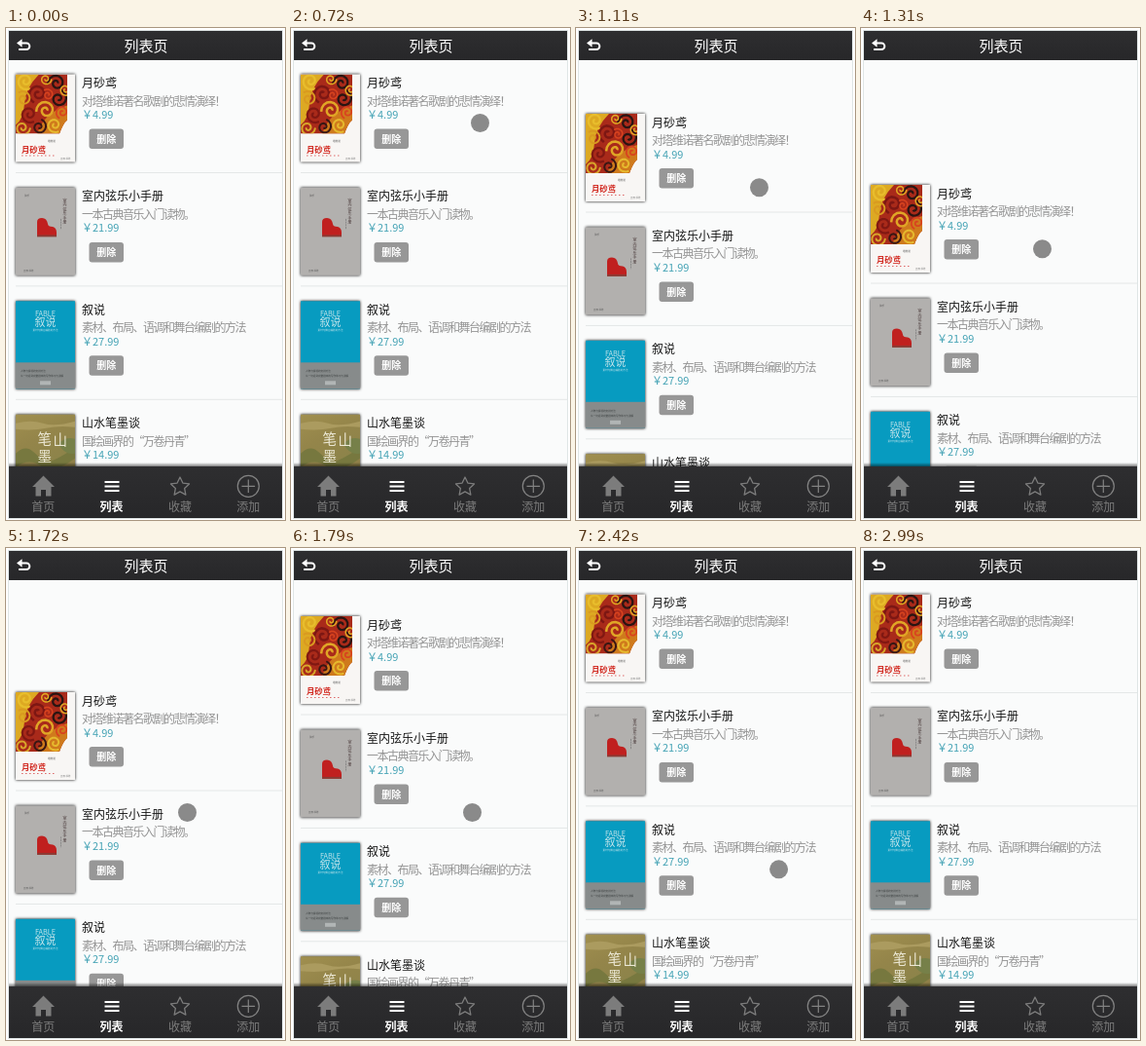
Recreate the animation shown at these times as an HTML page. Size 287x505 px, loop 3480 ms.

```html
<!DOCTYPE html>
<html lang="zh-CN">
<head>
<meta charset="utf-8">
<style>
  html, body { margin: 0; width: 100%; height: 100%; overflow: hidden; background: #fff; }
  svg { display: block; width: 287px; height: 505px; font-family: "Noto Sans CJK SC", "Noto Sans CJK", sans-serif; }
  .title { font-size: 12px; font-weight: 500; fill: #161616; }
  .desc { font-size: 12px; letter-spacing: -1.5px; fill: #949494; }
  .price { font-size: 11px; fill: #45a3b5; }
  .del { font-size: 10px; font-weight: 700; fill: #fff; text-anchor: middle; }
  .cover { filter: drop-shadow(0 0 1.8px #000); }
  .tab { font-size: 12px; text-anchor: middle; fill: #7c7c7c; }
  .tab.on { fill: #fff; font-weight: 700; }
  .tiny { font-size: 2.6px; }
</style>
</head>
<body>
<svg viewBox="0 0 287 505">
  <defs>
    <linearGradient id="bar" x2="0" y2="1">
      <stop stop-color="#2e2e30"/><stop offset="1" stop-color="#272729"/>
    </linearGradient>
    <linearGradient id="shade" x2="0" y2="1">
      <stop stop-color="#000" stop-opacity="0"/><stop offset="1" stop-color="#000" stop-opacity=".5"/>
    </linearGradient>
    <linearGradient id="gold" x2=".3" y2="1">
      <stop stop-color="#a08f4f"/><stop offset=".35" stop-color="#94854a"/><stop offset="1" stop-color="#85824a"/>
    </linearGradient>
    <clipPath id="page"><rect x="3" y="33" width="281" height="418"/></clipPath>
    <clipPath id="art"><path d="M0 0H53V47Q49 50 45 61H0Z"/></clipPath>
  </defs>
  <rect x="2.5" y="2.5" width="282" height="501" fill="#fafbfb" stroke="#dfe5e5"/>
  <g clip-path="url(#page)"><g id="list"></g></g>

  <rect x="3" y="3" width="281" height="30" fill="url(#bar)"/>
  <text x="144" y="23.5" font-size="15" font-weight="500" fill="#fff" text-anchor="middle">列表页</text>
  <g fill="none" stroke="#fff" stroke-width="2">
    <path d="M14 15.5H21A3.3 3.3 0 0 1 21 22.1H13"/>
    <path d="M16.5 11.2V19.8L11 15.5Z" fill="#fff" stroke="none"/>
  </g>

  <rect x="3" y="446" width="281" height="4" fill="url(#shade)"/>
  <rect x="3" y="450" width="281" height="53" fill="url(#bar)"/>
  <path d="M38.5 459.5L50 471H46.5V480.5H41V474H36V480.5H30.5V471H27Z" fill="#7c7c7c"/>
  <path d="M101.5 466h15m-15 4.5h15m-15 4.5h15" stroke="#fff" stroke-width="2"/>
  <path id="star" fill="none" stroke="#7c7c7c" stroke-width="1.3" stroke-linejoin="round"/>
  <g fill="none" stroke="#828282" stroke-width="1.2">
    <circle cx="249.3" cy="470.3" r="11"/><path d="M242.5 470.3h13.6m-6.8-6.8v13.6"/>
  </g>
  <g id="tabs"></g>
  <circle id="dot" r="9.5" fill="#777" fill-opacity=".86"/>
</svg>
<script>
const $ = id => document.getElementById(id);
const LOOP = 3480, PITCH = 116.4;

// Spiral stroke around x, y, starting at angle a
function curl(x, y, r, a, color) {
  const points = Array.from({ length: 24 }, (_, i) => {
    const s = r * (1 - i / 26), b = a + i * 0.42;
    return [(x + s * Math.cos(b)).toFixed(1), (y + s * Math.sin(b)).toFixed(1)];
  });
  return `<path d="M${points.join("L")}" fill="none" stroke="${color}" stroke-width="${r / 4}"/>`;
}

const swirls = [
  [10, 7, 9, 1, "#e8bd2c"], [23, 20, 10, 2, "#7d1713"], [42, 9, 9, 3, "#2a1512"],
  [31, 5, 6, 0, "#e2a822"], [44, 25, 9, 5, "#2a1512"], [8, 25, 8, 4, "#d99a20"],
  [14, 41, 9, 1, "#801812"], [31, 37, 10, 3, "#e0a626"], [48, 39, 7, 2, "#d8431f"],
  [7, 55, 8, 0, "#d8a52a"], [24, 54, 8, 5, "#3a1713"], [40, 52, 8, 1, "#e6b92d"],
  [33, 21, 6, 4, "#d8431f"], [51, 16, 6, 1, "#e0a626"]
].map(s => curl(...s)).join("");

const covers = [
  `<rect width="61" height="90" fill="#f8f6f4"/>
   <g clip-path="url(#art)">
     <rect width="61" height="62" fill="#a92a1a"/>
     <path d="M0 0H24Q10 14 9 30T0 52Z" fill="#dda922"/>
     <path d="M22 62Q28 40 53 32V62Z" fill="#cf7a1c"/>
     ${swirls}
   </g>
   <text x="6" y="80" font-size="8.3" font-weight="900" fill="#d1261d">月砂鸢</text>
   <text x="33" y="69" class="tiny" fill="#555">塔维诺</text>
   <path d="M6 83.5H40" stroke="#d66" stroke-dasharray="1.5 2.5"/>
   <text x="46" y="87" class="tiny" fill="#777">云石书坊</text>`,
  `<rect width="61" height="90" fill="#b2b0ae"/>
   <path d="M22 35Q22 31 27 31Q32 31 33 37Q33 40 38 40Q42 41 42 46V50H22Z" fill="#c0201f"/>
   <path d="M22 49.5h20" stroke="#8c3a34" stroke-width="2"/>
   <g class="tiny" fill="#555"><text x="9" y="9">弦乐</text><text x="8" y="86">云石书坊</text></g>
   <g font-size="4" fill="#4a3a3a">${[..."室内弦乐手册"].map((c, i) => `<text x="48.5" y="${15 + i * 4.5}">${c}</text>`).join("")}</g>
   <path d="M46.5 32v11" stroke="#777" stroke-width=".7" stroke-dasharray="2 .7"/>`,
  `<rect width="61" height="90" fill="#079bc0"/>
   <rect y="63" width="61" height="27" fill="#878b8b"/>
   <g fill="#c4e4ea" text-anchor="middle">
     <text x="30.5" y="16" font-size="7.3">FABLE</text>
     <text x="30.5" y="26" font-size="11">叙说</text>
     <text x="30.5" y="31" class="tiny">素材与舞台编剧的方法</text>
   </g>
   <g class="tiny" fill="#3c4040"><text x="5" y="73">人物与情境的安排方法</text><text x="5" y="78">从一句话到完整剧本的写作练习与讲解</text></g>
   <rect x="25" y="82" width="11" height="4" fill="#b1b5b5"/>`,
  `<rect width="61" height="90" fill="url(#gold)"/>
   <path d="M0 9Q16 5 28 9T61 7V13Q44 11 31 14T0 15Z" fill="#ab9b5f"/>
   <path d="M0 40Q10 30 19 39T34 48T61 34V90H0Z" fill="#77783f"/>
   <path d="M0 54Q14 44 26 53T61 45V90H0Z" fill="#8f8049"/>
   <path d="M44 30Q52 22 61 25V40Q50 42 44 30Z" fill="#768049"/>
   <g fill="#ece8d5" font-size="14.5"><text x="22.5" y="30">笔</text><text x="38.5" y="31">山</text><text x="22.5" y="48">墨</text></g>`
];

const books = [
  ["月砂鸢", "对塔维诺著名歌剧的悲情演绎！", "4.99"],
  ["室内弦乐小手册", "一本古典音乐入门读物。", "21.99"],
  ["叙说", "素材、布局、语调和舞台编剧的方法", "27.99"],
  ["山水笔墨谈", "国绘画界的“万卷丹青”", "14.99"]
];

$("list").innerHTML = books.map(([title, desc, price], i) => `
  <g transform="translate(0 ${i * PITCH})">
    <g class="cover"><g transform="translate(10 47.5)">${covers[i]}</g></g>
    <text class="title" x="78" y="61">${title}</text>
    <text class="desc" x="78" y="79.5">${desc}</text>
    <text class="price" x="78" y="93">￥${price}</text>
    <rect x="85.5" y="103.5" width="35.5" height="20.5" rx="3" fill="#979797"/>
    <text class="del" x="103.2" y="117.7">删除</text>
    <path d="M10 148.5H284" stroke="#e4e7e7"/>
  </g>`).join("");

$("tabs").innerHTML = ["首页", "列表", "收藏", "添加"].map((name, i) =>
  `<text class="tab ${i === 1 ? "on" : ""}" x="${38.3 + i * 70.3}" y="496">${name}</text>`).join("");

$("star").setAttribute("d", "M" + Array.from({ length: 10 }, (_, i) => {
  const r = i % 2 ? 4.9 : 10, a = i * Math.PI / 5;
  return [179 + r * Math.sin(a), 471 - r * Math.cos(a)];
}).join("L") + "Z");

// Keys hold a time followed by values
const pointer = [
  [370, 260, 218], [520, 125, 150], [720, 194.5, 97.5], [900, 194.5, 97.5],
  [1110, 188.5, 163.5], [1310, 186.5, 226.5], [1420, 186.5, 252.5], [1480, 186.5, 260],
  [1540, 186.5, 271.5], [1790, 186.5, 271.5], [1920, 186.5, 273.5], [2260, 186.5, 273.5],
  [2810, 262, 466], [2870, 261, 480], [2990, 259, 512]
];
const drag = [[980, 0], [1110, 40], [1310, 113.5], [1420, 140]];

function sample(keys, t) {
  const n = keys.findIndex(k => k[0] > t);
  if (n < 1) return keys.at(n).slice(1);
  const a = keys[n - 1], b = keys[n], u = (t - a[0]) / (b[0] - a[0]);
  return a.slice(1).map((v, i) => v + (b[i + 1] - v) * u);
}

function scrollAt(t) {
  const back = Math.min(1, Math.max(0, (t - 1700) / 200));
  return sample(drag, t)[0] * (1 - back) ** 3;
}

const start = performance.now();

function draw() {
  const t = (performance.now() - start) % LOOP, [x, y] = sample(pointer, t);
  $("list").setAttribute("transform", `translate(0 ${Math.round(scrollAt(t) * 2) / 2})`);
  $("dot").setAttribute("transform", `translate(${x} ${y})`);
  $("dot").setAttribute("visibility", t >= 370 && t < 2990 ? "visible" : "hidden");
  requestAnimationFrame(draw);
}
draw();
</script>
</body>
</html>
```
